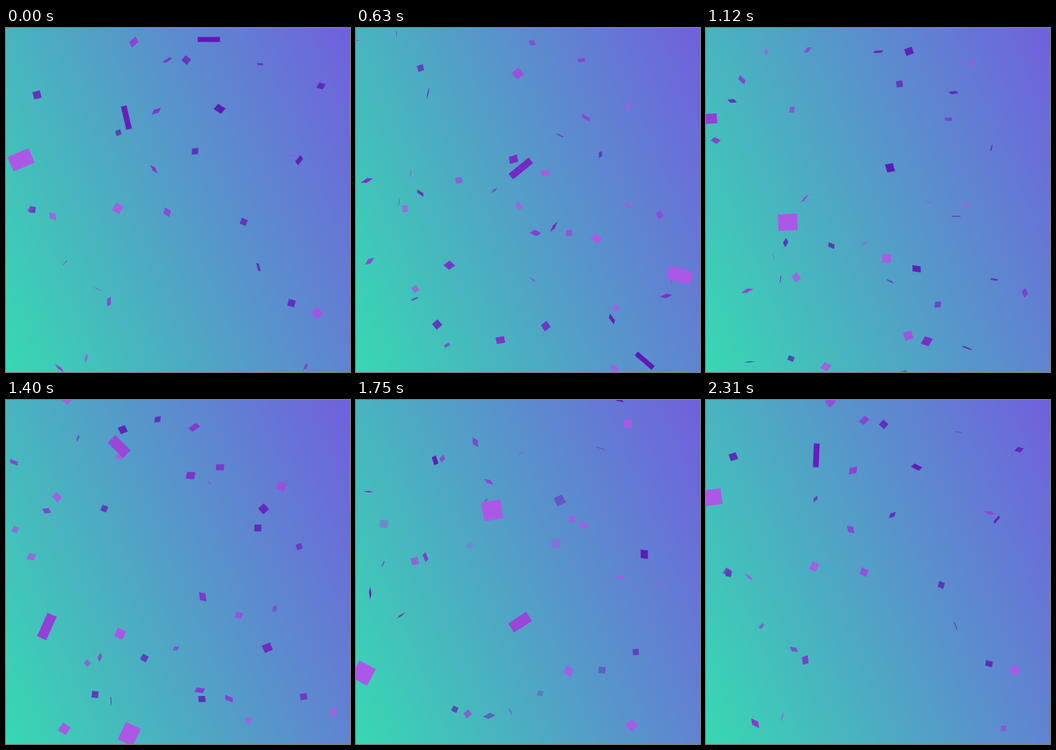
An HTML page with a canvas for the animation above (2.38 s loop, 480x480 px).

```html
<!DOCTYPE html>
<html lang="en">
<head>
<meta charset="utf-8">
<title>Confetti</title>
<style>
html, body { margin: 0; width: 100%; height: 100%; overflow: hidden; }
canvas { display: block; width: 100vw; height: 100vh; }
</style>
</head>
<body>
<canvas id="stage" width="480" height="480"></canvas>
<script>
const ctx = document.getElementById('stage').getContext('2d');
const STEP = 70, COUNT = 34;
const FADE_IN = 5, FADE_OUT = FADE_IN + COUNT + 20;
const GRAVITY = 0.2;

const sky = ctx.createLinearGradient(0, 480, 580, 236);
sky.addColorStop(0, '#38d8b2');
sky.addColorStop(1, '#7060de');

function random(seed) {
  return () => {
    seed = (seed * 16807) % 2147483647;
    return seed / 2147483647;
  };
}

const rnd = random(90210);
const range = (a, b) => a + (b - a) * rnd();
const mix = (a, b, k) => a + (b - a) * k;
const clamp = v => Math.max(0, Math.min(1, v));

// Near flakes fall faster and look bigger; the wind weakens to the right
function makeFlake() {
  const near = rnd(), x = range(-20, 490);
  return {
    start: range(-8, 72), x, y: 240,
    vx: 5.2 - 0.006 * x + near, vy: mix(10, 22, near),
    gravity: GRAVITY,
    size: mix(8, 13, near), aspect: 1,
    turn: range(0, 6.28), turnRate: range(-0.1, 0.1),
    flip: range(0, 6.28), flipRate: range(0.25, 0.55),
    roll: range(0, 6.28),
    alpha: mix(0.7, 1, near)
  };
}

// Closest pieces spin flat past the viewer; thin ones are turned away and darker
function makeLarge(start, x, y, size, height, turn) {
  return {
    start, x, y, size, turn,
    aspect: height / size,
    vx: 15.3 - 0.007 * x, vy: 48, gravity: GRAVITY * 2,
    turnRate: -0.27, roll: 0, alpha: 1,
    tone: clamp((height - 6) / 12)
  };
}

const flakes = Array.from({ length: 56 }, makeFlake);
const large = [
  makeLarge(34, 283, 16, 31, 7, 0),
  makeLarge(34, 168, 125, 33, 8, 1.34),
  makeLarge(34, 21, 184, 32, 22, -0.4),
  makeLarge(39, 402, 150, 34, 19, 1.35),
  makeLarge(9, 230, 196, 36, 10, -0.68),
  makeLarge(16, 114, 271, 27, 23, -0.05),
  makeLarge(20, 158, 65, 30, 15, 0.78),
  makeLarge(20, 57, 316, 36, 14, -1.15),
  makeLarge(25, 190, 154, 27, 27, -0.15),
  makeLarge(25, 10, 381, 26, 26, 0.5)
];

function tint(k) {
  return `rgb(${mix(90, 172, k)},${mix(18, 88, k)},${mix(178, 230, k)})`;
}

function drawPiece(p, u, fade) {
  const d = u - p.start;
  if (p.vy + p.gravity * d < 0) return; // not launched yet
  const flip = p.flip + p.flipRate * d;
  const flat = p.tone !== undefined;
  const squash = flat ? 1 : Math.max(0.1, Math.abs(Math.cos(flip)));
  const tone = flat ? p.tone : clamp(0.55 + 0.5 * Math.cos(flip + 0.6));
  const h = p.size * p.aspect;
  ctx.save();
  ctx.globalAlpha = fade * p.alpha;
  ctx.translate(p.x + p.vx * d, p.y + p.vy * d + p.gravity / 2 * d * d);
  ctx.rotate(p.turn + p.turnRate * d);
  ctx.scale(1, squash);
  ctx.rotate(p.roll);
  ctx.fillStyle = tint(tone);
  ctx.fillRect(-p.size / 2, -h / 2, p.size, h);
  ctx.restore();
}

function drawAt(u) {
  const fade = clamp((u - FADE_IN) / 4 + 0.5) * clamp((FADE_OUT - u) / 4 + 0.5);
  if (!fade) return;
  for (const p of flakes) drawPiece(p, u, fade);
  for (const p of large) drawPiece(p, u, fade);
}

function frame() {
  const step = Math.floor(performance.now() / STEP) % COUNT;
  ctx.fillStyle = sky;
  ctx.fillRect(0, 0, 480, 480);
  // Two overlapping passes of one long fall hide the seam
  drawAt(step + COUNT);
  drawAt(step);
  requestAnimationFrame(frame);
}
frame();
</script>
</body>
</html>
```
